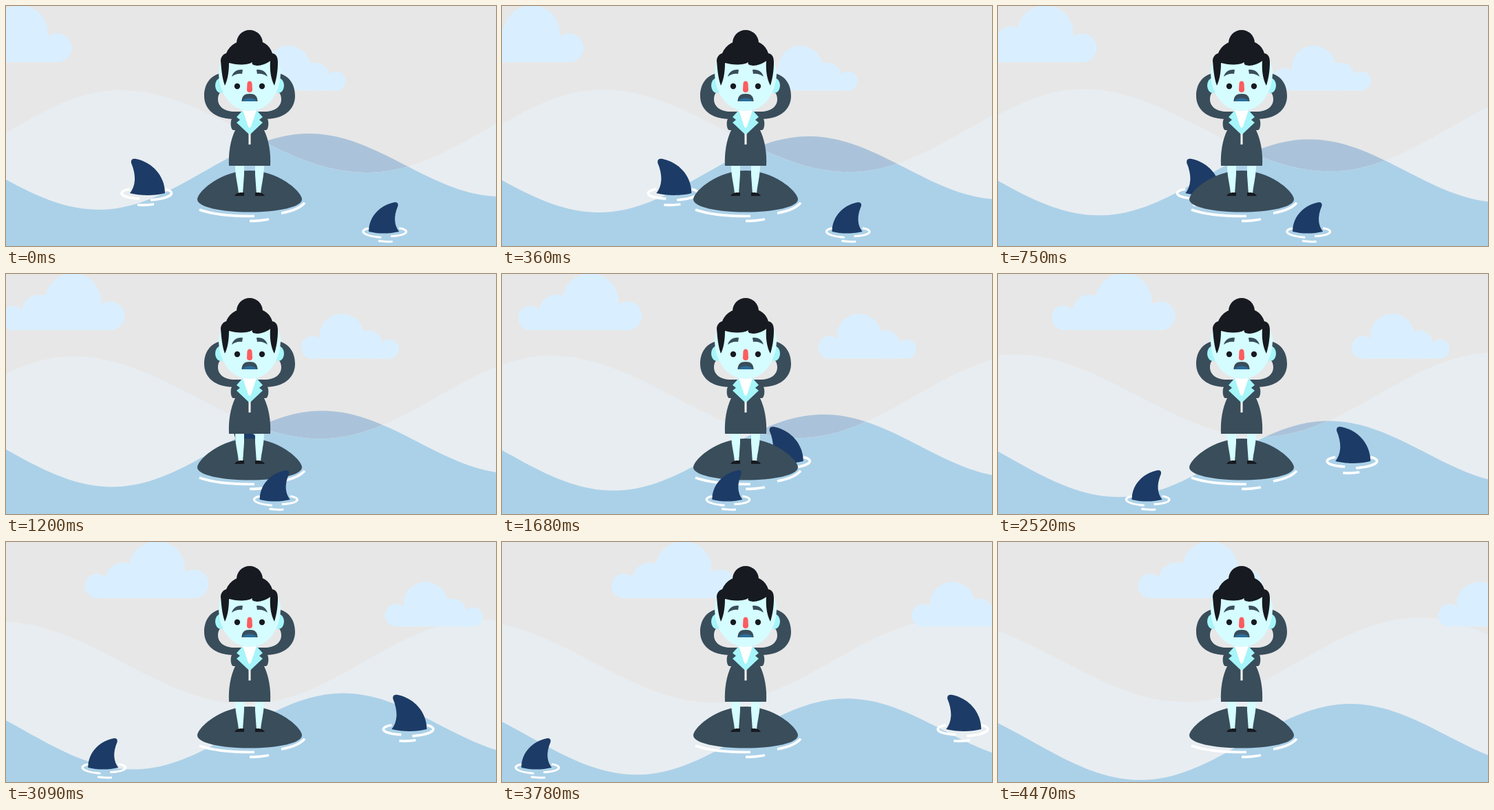
An HTML page for the animation above (4500 ms loop, 712 px wide and 350 px high).

```html
<!DOCTYPE html>
<html lang="en">
<head>
<meta charset="utf-8">
<title>Stranded</title>
<style>
  html, body { margin: 0; width: 100%; height: 100%; overflow: hidden; background: #e7e7e7; }
  svg { display: block; width: 712px; height: 350px; }
  .ripple { fill: none; stroke: #fff; stroke-width: 3.6; }
  .suit { fill: #394d5b; }
  .dark { fill: #171a20; }
  .skin { fill: #d5fcff; }
  .mint { fill: #a6f5f9; }
</style>
</head>
<body>
<svg viewBox="0 0 712 350" xmlns="http://www.w3.org/2000/svg">
  <defs>
    <clipPath id="hazeClip"><path class="haze"/></clipPath>

    <!-- origin at the left end and the top -->
    <g id="cloud" fill="#d9efff">
      <circle cx="105" cy="41" r="41"/>
      <circle cx="56" cy="57" r="26"/>
      <circle cx="17.5" cy="65" r="17.5"/>
      <circle cx="159" cy="62" r="21"/>
      <path d="M17 45H159V83H17Z" clip-path="inset(20px 0 0 0)"/>
    </g>

    <!-- origin at the fin tip -->
    <g id="shark">
      <path fill="#1c3b66" d="M0 6C-1 1 2-1 7 0C31 5 49 25 49 50C34 54 14 54-2 50C6 40 8 25 0 6Z"/>
      <path class="ripple" d="M-2 44C-18 46-22 56 12 58M49 44C66 48 61 57 28 60M9 67Q21 68 33 66"/>
    </g>

    <g id="limbs">
      <path class="suit" d="M313 98C296 101 288 115 288 131C288 151 304 165 332 165H340V154H332C318 154 308 147 308 136C308 128 312 124 318 122Z"/>
      <path class="skin" d="M333 231H346V246L344 274H338C337 260 333 250 333 231Z"/>
      <path class="dark" d="M332 277Q334 273 340 272H346V277Z"/>
      <ellipse class="mint" cx="312" cy="116" rx="8" ry="11"/>
    </g>

    <g id="features">
      <path class="suit" d="M328 103C330 96 336 92 344 93L343 99C337 98 332 100 328 103Z"/>
      <circle class="dark" cx="336" cy="117" r="4.2"/>
    </g>
  </defs>

  <rect width="712" height="350" fill="#e7e7e7"/>
  <path class="swell" fill="#abc3da"/>
  <path class="haze" fill="#e8edf1"/>
  <path class="swell" fill="#abd1e8" clip-path="url(#hazeClip)"/>

  <use id="cloudA" href="#cloud"/>
  <use id="cloudB" href="#cloud"/>
  <use id="sharkA" href="#shark"/>

  <path class="suit" d="M278 282C278 271 312 240 354 240C396 240 430 271 430 282C430 293 396 300.500 354 300.500C312 300.500 278 293 278 282Z"/>
  <path class="ripple" d="M281 297Q308 307 361 306.500M354 313.500Q370 313.500 382 311M400 302Q424 298 434 287"/>

  <g id="woman">
    <use href="#limbs"/>
    <use href="#limbs" transform="translate(708) scale(-1 1)"/>
    <path class="suit" d="M332 154L328 165C326 167 326 180 330 181H333C326 196 323 214 324 233H384C385 214 382 196 375 181H378C382 180 382 167 380 165L376 154Z"/>
    <path class="mint" d="M344 152L335 162L340 166L335 170L354 188L373 170L368 166L373 162L364 152Z"/>
    <path fill="#fff" d="M344 152H364L356 176Q354 179 352 176Z"/>
    <path d="M354 186V202" stroke="#fff" stroke-width="3"/>
    <path class="skin" d="M309 96C309 84 318 60 354 60C390 60 399 84 399 96C399 126 382 153 354 153C326 153 309 126 309 96Z"/>
    <use href="#features"/>
    <use href="#features" transform="translate(708) scale(-1 1)"/>
    <path fill="#ff5c60" d="M350.500 113Q351 109.500 354 109.500Q357 109.500 357.500 113L358 122Q358 126 354 126Q350 126 350 122Z"/>
    <path class="suit" d="M342.500 139C342.500 131 347 128 354 128C361 128 365.500 131 365.500 139Z"/>
    <path fill="#2b6d9b" d="M344 139C346 132.500 362 132.500 364 139Z"/>
    <circle class="dark" cx="354" cy="54" r="19"/>
    <path class="dark" d="M318 116C314 105 313 92 312 80C312 74 316 70 320 69C325 56 338 49 354 49C372 49 383 56 387 69C393 70 395 75 395 82C395 95 393 106 390 116C385 107 383 94 384 80C378 85 367 88 362 86.500C358 86 357 84 358 82C347 88 332 85 324 83C324 96 322 108 318 116Z"/>
  </g>

  <use id="sharkB" href="#shark"/>
</svg>
<script>
const LOOP = 4500, STEP = 30;
const $ = id => document.getElementById(id);

// Crests and troughs of each wave, joined by half cosines.
const swell = [[-177, 186], [135, 297], [440, 186], [720, 278], [1000, 186]];
const haze = [[-158, 243], [165, 122.8], [525, 243], [865, 120], [1200, 243]];

function height(knots, x) {
  let i = 1;
  while (i < knots.length - 1 && x > knots[i][0]) i++;
  const [x0, y0] = knots[i - 1], [x1, y1] = knots[i];
  const k = (1 - Math.cos(Math.PI * (x - x0) / (x1 - x0))) / 2;
  return y0 + (y1 - y0) * k;
}

function drawWave(name, knots, dx, dy) {
  let d = "M-8 360";
  for (let x = -8; x <= 720; x += 8) {
    d += `L${x} ${(height(knots, x - dx) + dy).toFixed(2)}`;
  }
  d += "L720 360Z";
  document.querySelectorAll("." + name).forEach(p => p.setAttribute("d", d));
}

function place(id, x, y, sx = 1, sy = sx) {
  $(id).setAttribute("transform", `translate(${x.toFixed(2)} ${y}) scale(${sx} ${sy})`);
}

function draw(t) {
  drawWave("swell", swell, 0.0161 * t, 0.0112 * t);
  drawWave("haze", haze, -0.0566 * t, -0.0022 * t);
  const drift = 0.0645 * t;
  place("cloudA", -85 + drift, -1);
  place("cloudB", 493.5 + drift, 58, -0.79, 0.79);
  place("sharkA", 182 + 0.1231 * t, 223);
  place("sharkB", 569.5 - 0.132 * t, 286.5, -0.865, 0.85);
}

function tick() {
  draw(Math.floor(performance.now() % LOOP / STEP) * STEP);
  requestAnimationFrame(tick);
}
tick();
</script>
</body>
</html>
```
